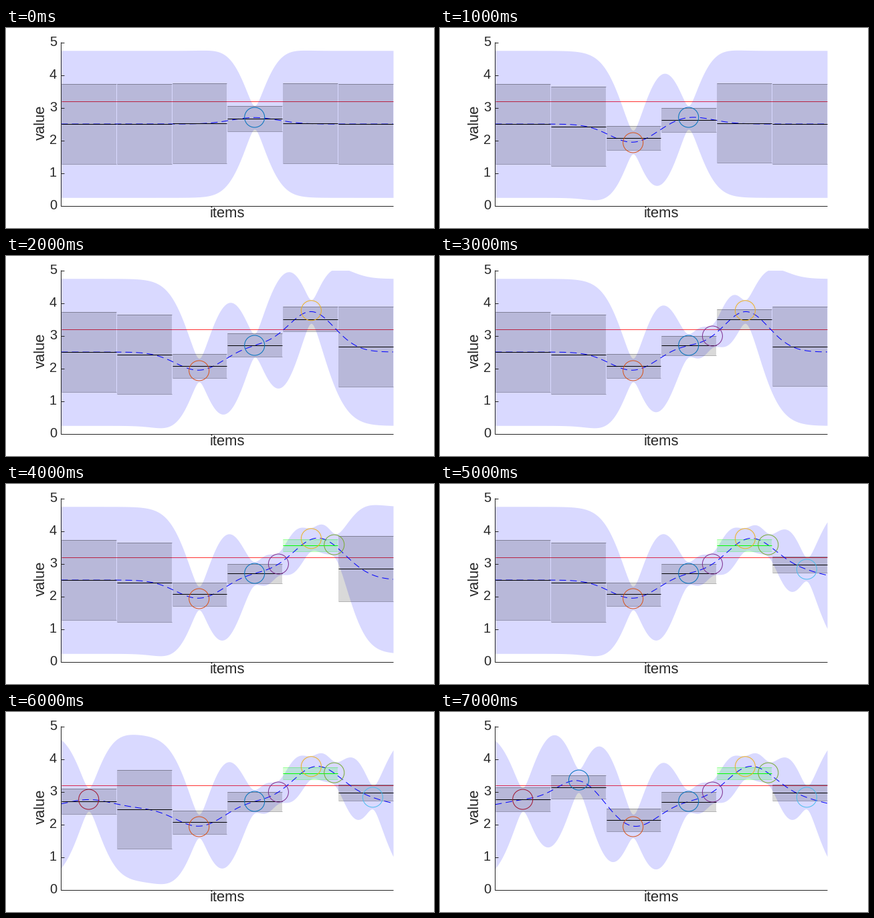
Animation, 640 px wide and 300 px high, one loop 8 s. Source, as a matplotlib script:

```python
import numpy as np
import matplotlib.pyplot as plt
from matplotlib.animation import FuncAnimation
from matplotlib.patches import Circle, Rectangle

W, H, DPI = 640, 300, 100
PX = 72 / DPI                      # one pixel in points
LEFT, STEP, ITEMS = 82.5, 82.75, 6
RIGHT = LEFT + STEP * ITEMS
BASE, UNIT = 266.55, 49.0          # pixel row of zero, pixels per value
INK = (0.15, 0.15, 0.15)
LIMIT = 3.2

# Gaussian process: prior mean, deviation, length in pixels, noise ratio
MEAN, SIGMA, LENGTH, NOISE = 2.5, 0.75, 34.8, 0.0266
BAND_Z, BAR_Z = 3.0, 1.96

SAMPLES = [(371.7, 2.704), (288.7, 1.93), (456.4, 3.77), (407.4, 2.99),
           (490.8, 3.58), (548.4, 2.83), (123.7, 2.765), (207.5, 3.357)]
COLORS = ["#0072BD", "#D95319", "#EDB120", "#7E2F8E",
          "#77AC30", "#4DBEEE", "#A2142F", "#0072BD"]

grid = np.linspace(LEFT, RIGHT, 994)
bins = [LEFT + STEP * (i + (np.arange(80) + 0.5) / 80) for i in range(ITEMS)]


def row(value):
    return BASE - UNIT * value


def kernel(a, b):
    return np.exp(-(a[:, None] - b[None, :]) ** 2 / (2 * LENGTH ** 2))


def posterior(cross, prior, xs, ys):
    """Mean and deviation, given covariances with the samples."""
    gain = np.linalg.solve(kernel(xs, xs) + NOISE * np.eye(len(xs)), cross.T).T
    var = prior - np.sum(gain * cross, axis=1)
    return MEAN + gain @ (ys - MEAN), SIGMA * np.sqrt(np.maximum(var, 0))


fig = plt.figure(figsize=(W / DPI, H / DPI), dpi=DPI, facecolor="white")
ax = fig.add_axes([0, 0, 1, 1])


def line(x, y, color, z, **kw):
    ax.plot(x, y, color=color, lw=PX, zorder=z, solid_capstyle="butt", **kw)


def label(x, y, text, size, **kw):
    ax.text(x, y, text, fontsize=size * PX, family="Liberation Sans",
            color=INK, **kw)


def draw_axes():
    ax.set(xlim=(0, W), ylim=(H, 0))
    ax.axis("off")
    edge = LEFT - 0.5
    line([edge, edge], [row(5) - 0.5, row(0) + 0.5], INK, 8)
    line([edge, RIGHT], [row(0)] * 2, INK, 8)
    for v in range(6):
        line([edge, edge + 5], [row(v)] * 2, INK, 8)
        label(76, row(v) + 5.6, str(v), 20, ha="right", va="baseline")
    label(330.3, 284, "items", 22, ha="center", va="baseline")
    label(63, 141.5, "value", 22, ha="right", va="center", rotation=90)


def draw_bar(i, mean, half):
    good = mean - half > LIMIT
    color = (0, 1, 0) if good else (0, 0, 0)
    x0 = LEFT + STEP * i + 0.5
    x1 = x0 + STEP - 1
    top, bottom = row(mean + half), row(mean - half)
    ax.add_patch(Rectangle((x0, top), x1 - x0, bottom - top, fc=color,
                           ec="none", alpha=0.15, zorder=3, snap=True))
    for y in (top, bottom):
        line([x0, x1], [y, y], color, 4, alpha=0.3)
    line([x0, x1], [row(mean)] * 2, color, 6)


def draw(step):
    ax.clear()
    draw_axes()
    xs, ys = np.array(SAMPLES[:step + 1]).T

    line([LEFT, RIGHT], [row(LIMIT)] * 2, "red", 1, alpha=0.8)
    mean, dev = posterior(kernel(grid, xs), 1.0, xs, ys)
    high = np.clip(mean + BAND_Z * dev, 0, 5)
    low = np.clip(mean - BAND_Z * dev, 0, 5)
    ax.fill_between(grid, row(low), row(high), color="blue", alpha=0.15,
                    lw=0, zorder=2)
    line(grid, row(mean), "blue", 5, dashes=(10, 6))

    # Each bar is the posterior of the average over one item.
    for i, b in enumerate(bins):
        cross = kernel(b, xs).mean(axis=0)[None, :]
        m, d = posterior(cross, kernel(b, b).mean(), xs, ys)
        draw_bar(i, m[0], BAR_Z * d[0])

    for x, y, color in zip(xs, ys, COLORS):
        ax.add_patch(Circle((x, row(y)), 15, fill=False, ec=color,
                            lw=PX, zorder=7))
    return []


anim = FuncAnimation(fig, draw, frames=len(SAMPLES), interval=1000,
                     init_func=lambda: [], repeat=True, repeat_delay=0)
plt.show()
```
